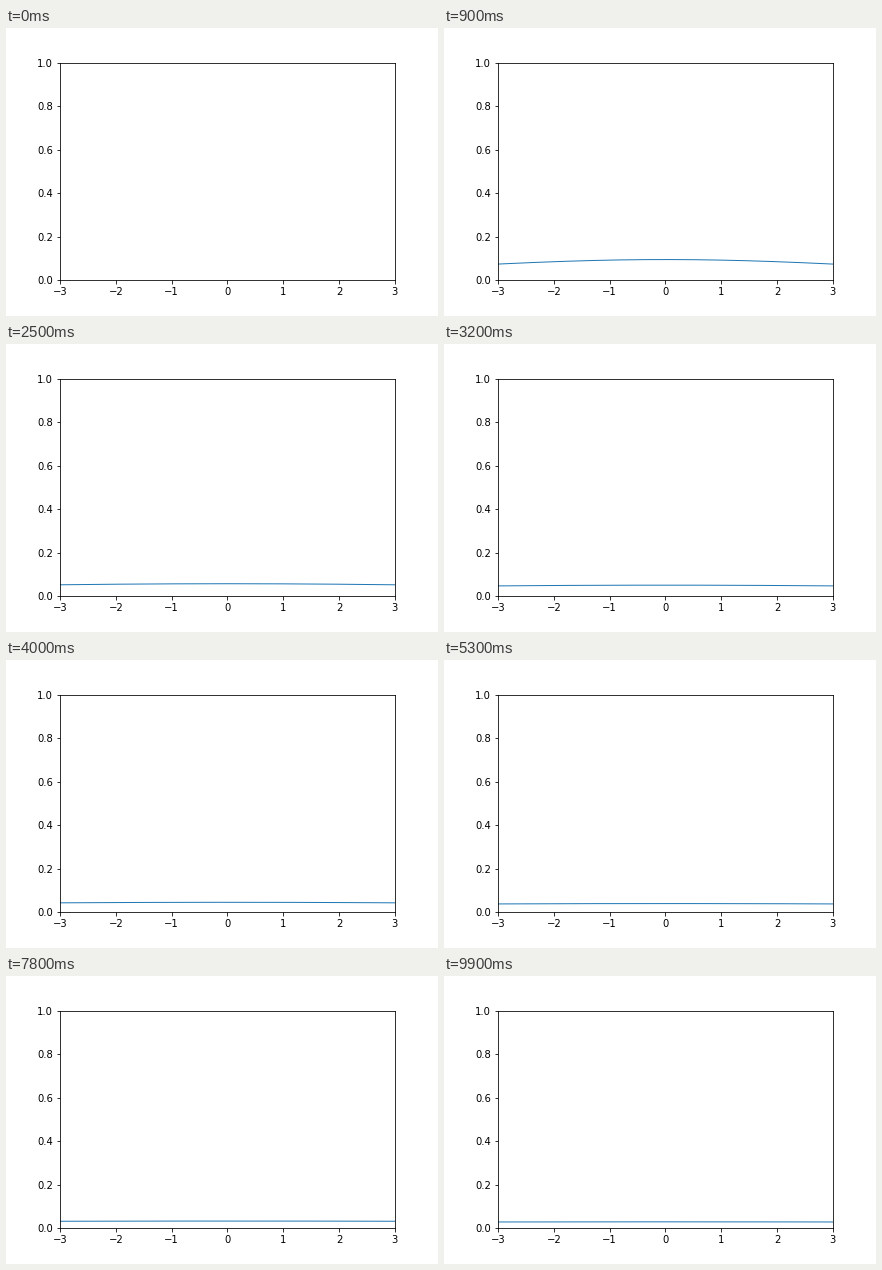
Animation of 432x288 px, one loop 10 s. Source, as a matplotlib script:

```python
import numpy as np
import matplotlib.pyplot as plt
from matplotlib.animation import FuncAnimation

FRAMES = 100
INTERVAL_MS = 100

fig = plt.figure(figsize=(6, 4), dpi=72)
ax = fig.add_axes([0.125, 0.125, 0.775, 0.755])
ax.set_xlim(-3, 3)
ax.set_ylim(0, 1)

x = np.linspace(-3, 3, 1000)
line, = ax.plot([], [], color="C0", lw=1)


def heat_kernel(x, t):
    """Spread of a unit point source after time t."""
    return np.exp(-x**2 / (4 * t)) / np.sqrt(4 * np.pi * t)


def update(t):
    # The point source itself has no drawable curve.
    if t == 0:
        line.set_data([], [])
    else:
        line.set_data(x, heat_kernel(x, t))
    return line,


anim = FuncAnimation(fig, update, frames=FRAMES, interval=INTERVAL_MS,
                     init_func=lambda: update(0), repeat=True)
plt.show()
```
